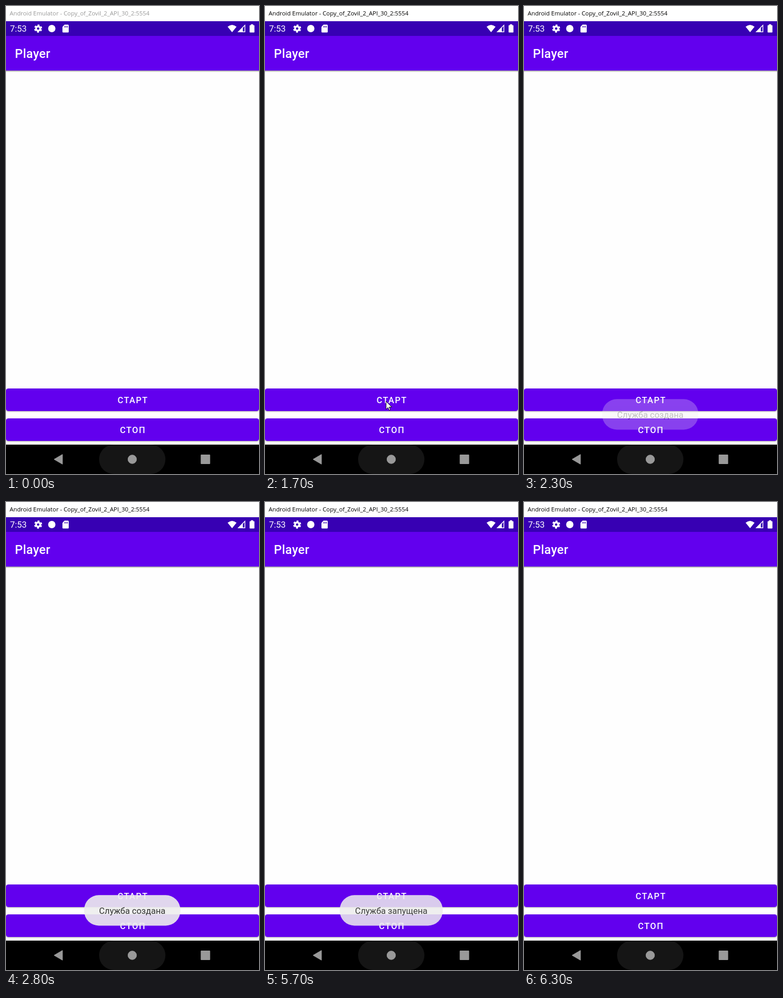
Animation of 484x892 px, one loop 8000 ms. Source, as an HTML page:

```html
<!DOCTYPE html>
<html lang="ru">
<head>
<meta charset="utf-8">
<title>Player</title>
<style>
  html, body { margin: 0; width: 100%; height: 100%; overflow: hidden; background: #fff; }
  svg { display: block; width: 484px; height: 892px; font-family: Roboto, sans-serif; }
  #title { font: 11.35px "Open Sans", sans-serif; }
  .button rect { fill: #6200ee; filter: drop-shadow(0 1.5px 1px rgba(0, 0, 0, .35)); }
  .button text { fill: #fff; font-size: 16.5px; font-weight: 500; letter-spacing: .0893em; }
  .button text, .toast text { text-anchor: middle; }
  .toast rect { fill: #eee; fill-opacity: .9; }
  .toast text { fill: #333; font-size: 16.5px; }
</style>
</head>
<body>
<svg viewBox="0 0 484 892">
  <defs>
    <linearGradient id="shade" x2="0" y2="1">
      <stop stop-opacity=".4"/>
      <stop offset="1" stop-opacity="0"/>
    </linearGradient>
    <clipPath id="startClip"><rect y="729" width="484" height="43" rx="4.5"/></clipPath>
  </defs>

  <rect width="484" height="892" fill="#fefefe"/>
  <rect width="484" height="29" fill="#fff"/>
  <text id="title" x="7" y="18">Android Emulator - Copy_of_Zovil_2_API_30_2:5554</text>

  <!-- status bar -->
  <rect y="29" width="484" height="28" fill="#3700b3"/>
  <g fill="#fff">
    <text x="7.7" y="49.3" font-size="16.5">7:53</text>
    <g fill="none" stroke="#fff" transform="translate(61.5 43) rotate(13.9)">
      <circle r="4" stroke-width="3.4"/>
      <circle r="6.4" stroke-width="2.6" stroke-dasharray="3.6 3.1"/>
    </g>
    <circle cx="87.6" cy="43" r="7"/>
    <path d="M112 35.5h6.5q1.5 0 1.5 1.5v12q0 1.5-1.5 1.5h-9q-1.5 0-1.5-1.5v-9.300z"/>
    <path d="M112.500 38v3m2.500-3v3m2.500-3v3" stroke="#3700b3" stroke-width="1.2"/>
    <path d="M432.500 50 424 39.600Q432.500 32.400 441 39.600z"/>
    <path d="M444.500 49.500 453 41v8.500z"/>
    <path d="M444.500 49.300H457V36.800z" fill="none" stroke="#fff" stroke-width="1.4"/>
    <rect x="466" y="36.500" width="9.300" height="14" rx="1.200"/>
    <rect x="468.600" y="34.800" width="4.100" height="3"/>
  </g>

  <!-- app bar -->
  <rect y="123" width="484" height="3" fill="url(#shade)"/>
  <rect y="57" width="484" height="66" fill="#6200ee"/>
  <text x="17" y="99.300" fill="#fff" font-size="23.600" font-weight="500" letter-spacing=".3">Player</text>

  <g class="button">
    <rect y="729" width="484" height="43" rx="4.500"/>
    <circle id="ripple" cy="750.500" fill="#fff" clip-path="url(#startClip)"/>
    <text x="242.700" y="757">СТАРТ</text>
  </g>
  <g class="button">
    <rect y="786" width="484" height="43" rx="4.500"/>
    <text x="242.700" y="814">СТОП</text>
  </g>

  <!-- navigation bar -->
  <rect y="836" width="484" height="56"/>
  <rect x="178" y="836" width="127" height="56" rx="28" fill="#151515"/>
  <g fill="#999" stroke="#999" stroke-linejoin="round">
    <path d="M92 864l16-9.300v18.600z"/>
    <circle cx="241.500" cy="864" r="8.200"/>
    <rect x="373" y="855.500" width="17" height="17"/>
  </g>

  <g class="toast" id="created">
    <rect x="149.500" y="749.300" width="184" height="58.200" rx="28"/>
    <text x="241.500" y="785">Служба создана</text>
  </g>
  <g class="toast" id="started">
    <rect x="143" y="749.300" width="197" height="58.200" rx="28"/>
    <text x="241.500" y="785">Служба запущена</text>
  </g>

  <path id="cursor" d="M0 0V15.300L3.600 11.800 6 17.200 8.200 16.200 5.900 10.900H10.800z"
        fill="#fff" stroke="#000" stroke-width=".9"/>
</svg>
<script>
  const LOOP = 8000, STEP = 100;
  const el = id => document.getElementById(id);
  const set = (id, attrs) => Object.entries(attrs).forEach(([k, v]) => el(id).setAttribute(k, v));

  // Linear interpolation through [time, value] pairs
  function track(t, keys) {
    if (t <= keys[0][0]) return keys[0][1];
    for (let i = 1; i < keys.length; i++) {
      const [a, u] = keys[i - 1], [b, v] = keys[i];
      if (t <= b) return u + (v - u) * (t - a) / (b - a);
    }
    return keys[keys.length - 1][1];
  }

  function draw(t) {
    set('title', { fill: t < 1700 ? '#999' : '#000' });

    const arrive = 1 - (1 - track(t, [[1000, 0], [1500, 1]])) ** 2;
    const leave = track(t, [[1900, 0], [2200, 1]]) ** 2;
    const x = 26 + 205.7 * arrive - 250 * leave;
    const y = 610 + 143.500 * arrive - 20 * leave;
    set('cursor', {
      transform: `translate(${x} ${y})`,
      visibility: t >= 1000 && t < 2200 ? 'visible' : 'hidden'
    });

    set('ripple', {
      cx: track(t, [[1700, 232], [2000, 242]]),
      r: track(t, [[1700, 0], [2000, 260]]),
      opacity: track(t, [[1700, 0], [1900, .24], [2000, .2], [2300, 0]])
    });

    set('created', {
      opacity: track(t, [[2200, 0], [2300, .3], [2400, .3], [2500, .5], [2800, 1],
                         [3800, 1], [3900, .8], [4200, 0]])
    });
    set('started', {
      opacity: track(t, [[3900, 0], [4300, 1], [5600, 1], [5700, .95], [6000, .3],
                         [6100, .3], [6200, .1], [6300, 0]])
    });
  }

  const begin = performance.now();
  function tick() {
    const t = (performance.now() - begin) % LOOP;
    draw(Math.floor(t / STEP) * STEP);
    requestAnimationFrame(tick);
  }
  tick();
</script>
</body>
</html>
```
